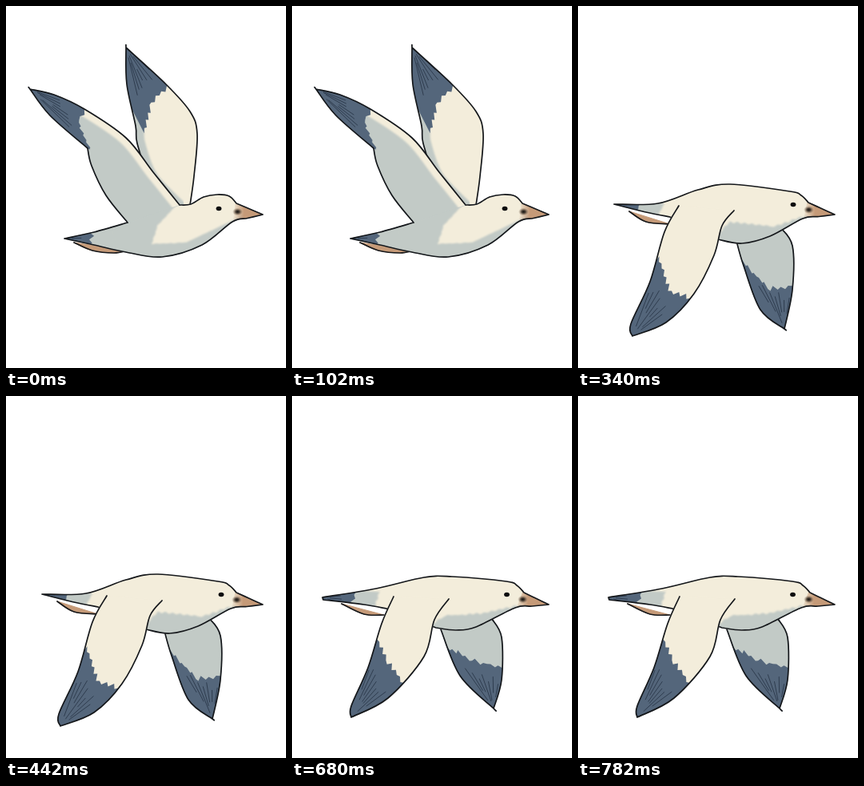
Recreate the animation shown at these times as an HTML page. Size 350 by 453 pixels, loop 0.85 s.

```html
<!DOCTYPE html>
<html lang="en">
<head>
<meta charset="utf-8">
<title>Flying seabird</title>
<style>
html, body { margin: 0; width: 100%; height: 100%; overflow: hidden; background: #fff; }
svg { display: block; width: 100%; height: 100%; }
path { stroke-linecap: round; stroke-linejoin: round; }
.ink { fill: none; stroke: #14171b; stroke-width: 1.7; }
.feather { fill: none; stroke: #2b384a; stroke-width: .9; }
</style>
</head>
<body>
<svg id="stage" viewBox="0 0 350 453">
  <defs>
    <linearGradient id="beak">
      <stop offset="0" stop-color="#c59a78" stop-opacity="0"/>
      <stop offset=".35" stop-color="#c59a78"/>
    </linearGradient>
    <radialGradient id="smudge">
      <stop offset="0" stop-color="#15130f"/>
      <stop offset=".35" stop-color="#2c251e" stop-opacity=".85"/>
      <stop offset="1" stop-color="#8a6f58" stop-opacity="0"/>
    </radialGradient>
    <filter id="soft"><feGaussianBlur stdDeviation=".9"/></filter>
  </defs>
</svg>
<script>
const CREAM = '#f3eddb', GREY = '#c2cac6', SLATE = '#54667b', TAN = '#c59a78';
const HOLD = 170, BEAK_TIP = [321, 261];

// Key points of each pose. Wings: leading edge root to tip, trailing edge tip to root,
// and the line where the dark tip starts. "|" marks a corner.
const poses = [
  {
    up: true, eye: [266, 253.5], brow: [288, 247], chin: [283, 270],
    back: '217,249 231,248 247,239 264,236',
    belly: '245,299 195,314 150,308 110,299 73,291|110,283 152,271',
    tone: '214,248 190,274 182,298 225,296 284,268',
    tail: '108,279 104,301', tailTip: [73, 291], under: '85,296 108,306 135,309 152,306',
    far: { lead: '230,249 235,213 239,160 230,132 200,98 150,52', trail: '150,52 151,98 162,150 164,172 180,215 215,252', dark: '204,97 182,122 172,158', rim: 10 },
    near: { lead: '217,249 184,208 150,165 98,129 60,111 30,104', trail: '30,104 55,137 102,178|107,200 125,237 152,271', dark: '101,127 90,142 105,180', rim: 9 }
  },
  {
    up: true, eye: [272, 254], brow: [291, 247], chin: [287, 268],
    back: '217,251 233,247 250,238 268,235',
    belly: '245,294 195,308 135,298 64,287|95,279 118,275 148,264',
    tone: '212,250 191,269 187,291 225,292 288,265',
    tail: '103,275 102,295', tailTip: [64, 287], under: '82,289 105,298 125,301 138,299',
    far: { lead: '235,248 268,193 307,135 328,98', trail: '328,98 285,115 250,134 215,167 179,208|200,245', dark: '312,134 268,146 222,155', rim: 16 },
    near: { lead: '217,251 190,231 165,198 115,172 86,160 33,138', trail: '33,138 50,173 91,205|107,219 122,240 148,264', dark: '91,158 79,175 93,208', rim: 9 }
  },
  {
    eye: [269, 248.5], brow: [288, 246], chin: [281, 266],
    back: '45,248 100,247 150,230 190,223 265,232',
    belly: '240,288 205,297 175,292|115,264|85,258 45,248',
    tone: '286,262 245,276 190,270 176,284',
    tail: '78,247 68,265', tailTip: [45, 248], under: '64,257 85,270 115,273',
    far: { lead: '252,276 268,300 268,355 258,404', trail: '258,404 228,380 207,325 198,294', dark: '272,349 240,355 203,318' },
    near: { lead: '195,256 180,275 170,312 145,360 110,396 68,413', trail: '68,413|66,398 90,345 108,283 126,250', dark: '142,365 116,358 101,314' }
  },
  {
    eye: [262.5, 246], brow: [283, 245], chin: [275, 264],
    back: '34,240 70,241 130,227 175,220 256,229',
    belly: '230,287 205,291 176,291|115,262|75,251 36,244|34,240',
    tone: '281,261 240,270 189,267 174,280',
    tail: '71,237 69,254', tailTip: [34, 240], under: '48,248 75,262 112,267',
    far: { lead: '240,276 248,292 240,350 215,401', trail: '215,401 203,385 190,340 179,291', dark: '245,345 208,347 182,308' },
    near: { lead: '189,248 176,285 160,340 145,371 113,405', trail: '113,405|103,391 104,350 110,290 123,248', dark: '148,366 130,347 107,311' }
  },
  {
    eye: [268.5, 248.5], brow: [290, 246], chin: [279, 265],
    back: '38,252 105,241 165,227 200,226 268,232',
    belly: '230,289 205,293 180,290|118,266|90,261 39,255|38,252',
    tone: '287,261 240,272 190,275 175,286',
    tail: '80,245 72,266', tailTip: [38, 252], under: '62,260 90,273 115,274',
    far: { lead: '250,279 262,302 262,355 252,391', trail: '252,391 210,350 186,292', dark: '267,340 225,331 192,312' },
    near: { lead: '196,254 178,280 165,326 120,378 74,402', trail: '74,402|74,388 95,340 112,285 127,251', dark: '140,359 120,334 107,304' }
  }
];

const points = run => run.split(' ').map(p => p.split(',').map(Number));
const mix = (a, b, t) => a.map((v, k) => v + (b[k] - v) * t);
const add = (a, b, s = 1) => a.map((v, k) => v + b[k] * s);

let seed = 7;
function random() {
  seed = seed * 16807 % 2147483647;
  return seed / 2147483647;
}

// Catmull-Rom spline through the points, written as cubic curves.
function spline(p) {
  let d = '';
  for (let i = 0; i + 1 < p.length; i++) {
    const a = p[i - 1] || p[i], b = p[i], c = p[i + 1], e = p[i + 2] || c;
    d += `C${add(b, add(c, a, -1), 1 / 6)} ${add(c, add(e, b, -1), -1 / 6)} ${c}`;
  }
  return d;
}

function outline(text) {
  let d = '', last;
  for (const run of text.split('|')) {
    const p = points(run);
    if (last) p.unshift(last);
    else d = 'M' + p[0];
    d += spline(p);
    last = p[p.length - 1];
  }
  return d;
}

// Colours everything from a ragged line onwards in the direction of a point.
function dip(edge, toward, fill, rough) {
  const p = points(edge), a = p[0], z = p[p.length - 1];
  const way = add(toward, mix(a, z, .5), -1), size = Math.hypot(...way);
  const ragged = [a];
  for (let i = 0; i + 1 < p.length; i++) {
    const n = Math.ceil(Math.hypot(...add(p[i + 1], p[i], -1)) / 5);
    for (let j = 1; j <= n; j++) {
      const side = j % 2 ? 1 : -1;
      ragged.push(add(mix(p[i], p[i + 1], j / n), way, side * random() * rough / size));
    }
  }
  ragged.push(add(z, way, 1.3), add(a, way, 1.3));
  const soft = rough < 2 ? ' filter="url(#soft)"' : '';
  return `<path d="M${ragged.join('L')}Z" fill="${fill}"${soft}/>`;
}

// Thin strokes that run from the ragged line towards the tip.
function feathers(edge, tip, count) {
  const p = points(edge);
  let d = '';
  for (let i = 0; i < count; i++) {
    const root = mix(p[0], p[p.length - 1], (i + .5) / count);
    d += `M${mix(root, tip, .3 + random() * .2)}L${mix(root, tip, .6 + random() * .3)}`;
  }
  return `<path class="feather" d="${d}"/>`;
}

function shape(d, fill, inside, id) {
  return `<clipPath id="${id}"><path d="${d}Z"/></clipPath>
    <path d="${d}Z" fill="${fill}" stroke="${fill}" stroke-width="1.2"/>
    <g clip-path="url(#${id})">${inside}</g><path class="ink" d="${d}"/>`;
}

function wing({ lead, trail, dark, rim }, fill, rimFill, id) {
  const tip = points(lead).pop();
  const edge = outline(rimFill === CREAM ? lead : trail);
  const band = rim ? `<path d="${edge}" fill="none" stroke="${rimFill}" stroke-width="${rim * 2}" filter="url(#soft)"/>` : '';
  return shape(outline(lead + '|' + trail), fill, band + dip(dark, tip, SLATE, 4) + feathers(dark, tip, 7), id);
}

function body(pose, id) {
  const { up, brow, chin, tail, tailTip } = pose;
  const d = outline(`${pose.back} ${add(brow, [-9, -9])} ${brow}|${mix(brow, BEAK_TIP, .45)} ${BEAK_TIP}|${mix(BEAK_TIP, chin, .5)} ${chin} ${pose.belly}`);
  const greyTail = points(tail).map(p => add(p, [30, 0])).join(' ');
  const beak = [add(brow, [-1, -3]), add(BEAK_TIP, [4, 0]), add(chin, [0, 4])];
  const inside = dip(greyTail, tailTip, GREY, 1.5)
    + dip(pose.tone, up ? [300, 230] : [231, 310], up ? CREAM : GREY, 1.5)
    + dip(tail, tailTip, SLATE, 4) + feathers(tail, tailTip, 3)
    + `<path d="M${beak.join('L')}Z" fill="url(#beak)"/>`;
  return shape(d, up ? GREY : CREAM, inside, id);
}

function drawPose(pose, n) {
  const { up, eye, brow, chin } = pose;
  const nose = add(mix(brow, chin, .5), [4, -1]);
  return `<g class="pose">
    ${wing(pose.far, up ? CREAM : GREY, GREY, 'far' + n)}
    ${shape(outline(pose.under), TAN, '', 'under' + n)}
    ${body(pose, 'body' + n)}
    ${wing(pose.near, up ? GREY : CREAM, CREAM, 'near' + n)}
    <ellipse cx="${nose[0]}" cy="${nose[1]}" rx="6.5" ry="5" fill="url(#smudge)"/>
    <ellipse cx="${eye[0]}" cy="${eye[1]}" rx="3.4" ry="2.8" fill="#0b0c0e"/></g>`;
}

const stage = document.getElementById('stage');
stage.insertAdjacentHTML('beforeend', poses.map(drawPose).join(''));
const groups = [...stage.querySelectorAll('.pose')];
const start = performance.now();

function show(ms) {
  const now = Math.floor(ms / HOLD) % groups.length;
  groups.forEach((g, i) => g.setAttribute('display', i === now ? 'inline' : 'none'));
}

function tick(t) {
  show(Math.max(0, t - start));
  requestAnimationFrame(tick);
}

show(0);
requestAnimationFrame(tick);
</script>
</body>
</html>
```
